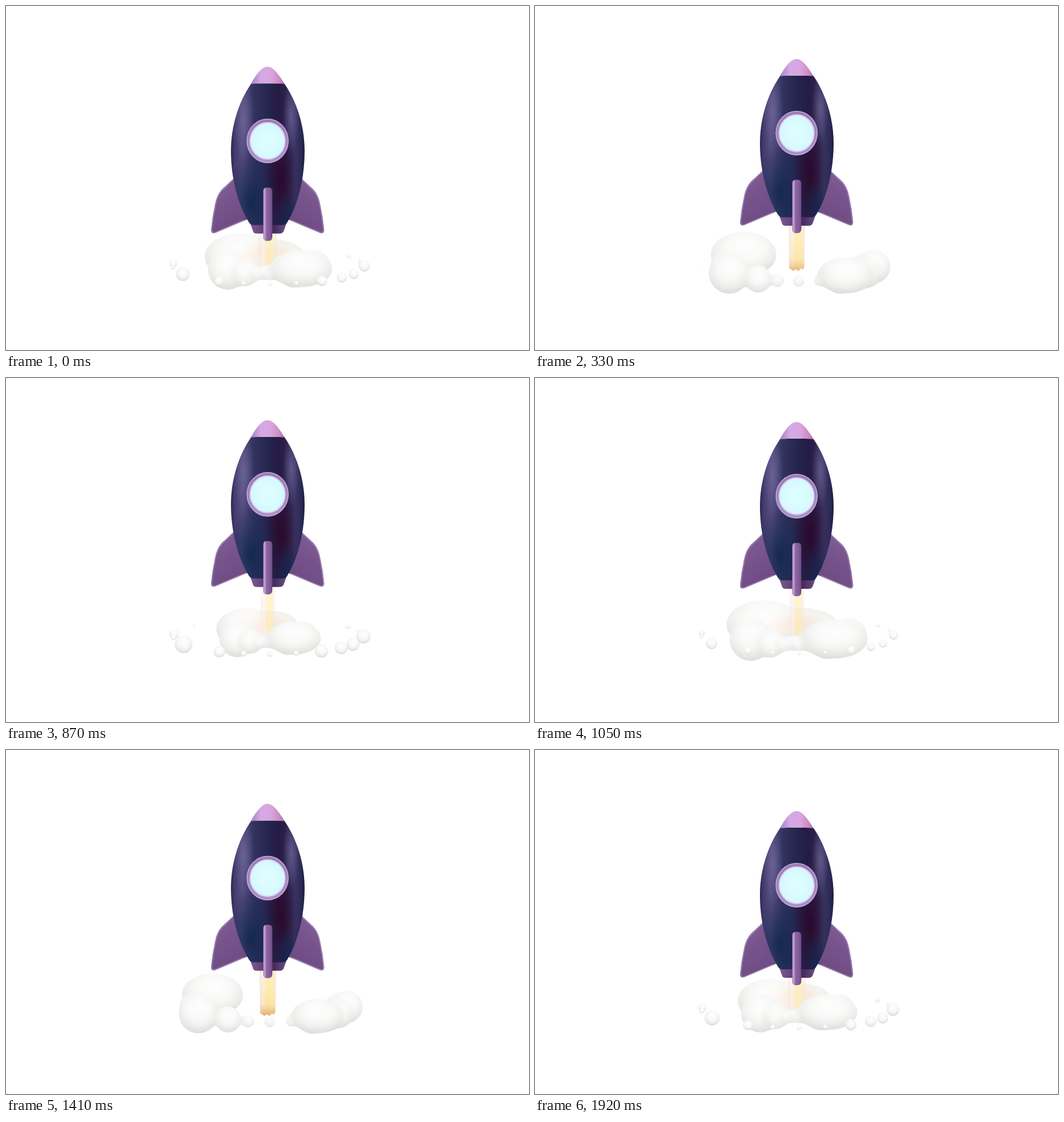
Write an HTML page that moves like this. It is 923 by 607 pixels and loops after 1.95 s.

```html
<!DOCTYPE html>
<html lang="en">
<head>
<meta charset="utf-8">
<title>Rocket</title>
<style>
  html, body { margin: 0; width: 100%; height: 100%; overflow: hidden; background: #fff; }
  svg { display: block; width: 100vw; height: 100vh; }
</style>
</head>
<body>
<svg viewBox="0 0 923 607">
  <defs>
    <radialGradient id="ball" cx=".5" cy=".4" r=".61" fx=".53" fy=".3">
      <stop offset="0" stop-color="#fefefe"/>
      <stop offset=".5" stop-color="#f9f9f8"/>
      <stop offset=".8" stop-color="#ecedea"/>
      <stop offset="1" stop-color="#d3d6d1"/>
    </radialGradient>
    <radialGradient id="wall">
      <stop offset="0" stop-color="#f4efea"/>
      <stop offset=".65" stop-color="#f5f2ee"/>
      <stop offset=".88" stop-color="#f7f8f6"/>
      <stop offset="1" stop-color="#e2e8e4"/>
    </radialGradient>
    <radialGradient id="warm">
      <stop offset="0" stop-color="#fbdcc0" stop-opacity=".7"/>
      <stop offset="1" stop-color="#fbe9dc" stop-opacity="0"/>
    </radialGradient>
    <linearGradient id="jet">
      <stop offset="0" stop-color="#efe3e2" stop-opacity=".7"/>
      <stop offset=".25" stop-color="#fbf3ea"/>
      <stop offset=".4" stop-color="#fdebc4"/>
      <stop offset=".6" stop-color="#fff0a8"/>
      <stop offset=".82" stop-color="#fcecc6"/>
      <stop offset="1" stop-color="#f3e5e0" stop-opacity=".7"/>
    </linearGradient>
    <linearGradient id="ember" x1="0" y1="0" x2="0" y2="1">
      <stop offset=".2" stop-color="#ffdf7c" stop-opacity=".1"/>
      <stop offset=".75" stop-color="#fbd488" stop-opacity=".5"/>
      <stop offset="1" stop-color="#d99a62"/>
    </linearGradient>
    <linearGradient id="hull">
      <stop offset="0" stop-color="#2d2650"/>
      <stop offset=".05" stop-color="#453c6c"/>
      <stop offset=".15" stop-color="#504a7c"/>
      <stop offset=".32" stop-color="#32325e"/>
      <stop offset=".5" stop-color="#25264e"/>
      <stop offset=".64" stop-color="#251c44"/>
      <stop offset=".74" stop-color="#2a2049"/>
      <stop offset=".86" stop-color="#383462"/>
      <stop offset=".95" stop-color="#2c2b56"/>
      <stop offset="1" stop-color="#1d1b42"/>
    </linearGradient>
    <radialGradient id="shine">
      <stop offset="0" stop-color="#7d72a6" stop-opacity=".6"/>
      <stop offset="1" stop-color="#7d72a6" stop-opacity="0"/>
    </radialGradient>
    <radialGradient id="navy">
      <stop offset="0" stop-color="#10274e" stop-opacity=".9"/>
      <stop offset="1" stop-color="#142a50" stop-opacity="0"/>
    </radialGradient>
    <radialGradient id="plum">
      <stop offset="0" stop-color="#2a0829" stop-opacity=".95"/>
      <stop offset="1" stop-color="#2f0b32" stop-opacity="0"/>
    </radialGradient>
    <linearGradient id="nose">
      <stop offset="0" stop-color="#a680c2"/>
      <stop offset=".3" stop-color="#d5a9e4"/>
      <stop offset=".6" stop-color="#d9a5e0"/>
      <stop offset=".85" stop-color="#cd8cc2"/>
      <stop offset="1" stop-color="#a46ba8"/>
    </linearGradient>
    <linearGradient id="fin" x1="0" y1="0" x2=".6" y2="1">
      <stop offset="0" stop-color="#85629b"/>
      <stop offset=".5" stop-color="#77538b"/>
      <stop offset="1" stop-color="#6b4a80"/>
    </linearGradient>
    <linearGradient id="keel">
      <stop offset="0" stop-color="#a584bd"/>
      <stop offset=".18" stop-color="#c4a3d6"/>
      <stop offset=".35" stop-color="#8d65a0"/>
      <stop offset=".75" stop-color="#825a98"/>
      <stop offset="1" stop-color="#694680"/>
    </linearGradient>
    <linearGradient id="base">
      <stop offset="0" stop-color="#7d5a94"/>
      <stop offset=".35" stop-color="#634376"/>
      <stop offset=".65" stop-color="#452a5a"/>
      <stop offset="1" stop-color="#6b4f88"/>
    </linearGradient>
    <linearGradient id="ring" x1="0" y1="0" x2="0" y2="1">
      <stop offset="0" stop-color="#9c78b2"/>
      <stop offset="1" stop-color="#ac92ca"/>
    </linearGradient>
    <radialGradient id="glass">
      <stop offset=".4" stop-color="#dcfdff"/>
      <stop offset="1" stop-color="#d5f8fd"/>
    </radialGradient>
    <filter id="goo" filterUnits="userSpaceOnUse" x="260" y="350" width="410" height="190" color-interpolation-filters="sRGB">
      <feGaussianBlur id="melt" stdDeviation="5"/>
      <feColorMatrix values="1 0 0 0 0  0 1 0 0 0  0 0 1 0 0  0 0 0 8 -3.5"/>
    </filter>
    <path id="hullShape" d="M433 136C409 171 397 214 397 255C397 305 410 350 428 380Q431 386 437 386H488Q494 386 497 380C515 350 527 305 527 255C527 214 515 171 491 136Z"/>
    <clipPath id="hullClip"><use href="#hullShape"/></clipPath>
    <g id="sideFin">
      <path d="M404 302L381 323Q372 333 369 349Q364 372 362 394Q361.500 402 369 400L440 370V302Z" fill="url(#fin)"/>
      <path d="M403 303.500L382 324Q373 333 370 349Q365 372 363 394Q363 400 369 399L420 377.500" fill="none" stroke="#a68cc0" stroke-width="2" stroke-opacity=".7"/>
    </g>
  </defs>

  <g id="oldBack"></g>
  <g id="newBack" filter="url(#goo)"></g>
  <ellipse id="glow" cx="462" cy="437" rx="54" ry="32" fill="url(#warm)"/>
  <path id="flame" fill="url(#jet)"/>
  <path id="tip" fill="url(#ember)"/>
  <g id="newFront" filter="url(#goo)"></g>
  <g id="oldFront"></g>

  <g id="rocket">
    <use href="#sideFin"/>
    <use href="#sideFin" transform="translate(923.4) scale(-1 1)"/>
    <path d="M431 383L436 397Q437 401 442 401H483Q488 401 490 397L495 383Z" fill="url(#base)"/>
    <use href="#hullShape" fill="url(#hull)"/>
    <g clip-path="url(#hullClip)">
      <ellipse cx="420" cy="200" rx="18" ry="75" fill="url(#shine)"/>
      <ellipse cx="503" cy="195" rx="15" ry="65" fill="url(#shine)"/>
      <ellipse cx="432" cy="345" rx="46" ry="85" fill="url(#navy)"/>
      <ellipse cx="485" cy="305" rx="30" ry="90" fill="url(#plum)"/>
      <ellipse cx="500" cy="375" rx="26" ry="50" fill="url(#navy)"/>
    </g>
    <path d="M432 137C441 121 449 111 456 107.800Q461.500 105.500 467 107.800C474 111 482 121 491.500 137Q462 134.500 432 137Z" fill="url(#nose)"/>
    <ellipse cx="461.700" cy="237.500" rx="37" ry="39.200" fill="url(#ring)"/>
    <ellipse cx="461.700" cy="237.500" rx="36.300" ry="38.500" fill="none" stroke="#c3abdc" stroke-width="1.500"/>
    <ellipse cx="461.700" cy="237.500" rx="30.800" ry="32.300" fill="url(#glass)" stroke="#d8cdf2" stroke-width="2"/>
    <path d="M454 326Q454 320 460 320H464Q470 320 470 326V406Q470 414 463 414H460Q454 414 454 408Z" fill="url(#keel)"/>
  </g>
</svg>
<script>
const LOOP = 1950, STEP = 30, TAU = 2 * Math.PI;
const BIRTH = 0.63;                      // age at which a puff appears
const RING = { x: 463, y: 460, rx: 170, ry: 32 };

// Puffs round the ring, back to front: angle in degrees, radius
const PUFFS = [
  [-33, 8], [187, 15], [-17, 8], [176, 8], [0, 22], [27, 20], [153, 27],
  [40, 20], [56, 20], [121, 18], [73, 8], [105, 9], [89, 8]
];
const LEFT_LOBE = [219, 26], RIGHT_LOBE = [56, 20];

const $ = id => document.getElementById(id);
const clamp = v => Math.min(1, Math.max(0, v));

// How a burst of smoke develops with age
const grow = age => clamp((age - BIRTH) / .6) ** .35;
const size = age => 1.55 * grow(age) * (1 - clamp((age - 1.24) / 1.21)) ** 1.25;
const spread = age => 1 - (1 - clamp((age - .65) / 1.5)) ** 2.4;
const swell = age => Math.sin(Math.PI * clamp(age - BIRTH));
const bridge = age => clamp((1.37 - age) / .14);

function ellipse(parent, fill) {
  const el = document.createElementNS('http://www.w3.org/2000/svg', 'ellipse');
  el.setAttribute('fill', `url(#${fill})`);
  return parent.appendChild(el);
}

function place(el, cx, cy, rx, ry) {
  const shape = { cx, cy, rx, ry };
  for (const name in shape) el.setAttribute(name, shape[name].toFixed(2));
}

function makeCloud(back, front) {
  const wall = ellipse(back, 'wall');
  const left = ellipse(back, 'ball');
  const neck = ellipse(front, 'ball');
  const balls = PUFFS.map(() => ellipse(front, 'ball'));
  const right = ellipse(front, 'ball');

  return (age, drift) => {
    const out = spread(age), join = bridge(age) * grow(age);
    const puff = (el, [deg, r], wide = 0, scale = size(age)) => {
      const a = deg * TAU / 360;
      place(el,
        RING.x + RING.rx * Math.cos(a) * out + 14 * wide,
        RING.y + RING.ry * Math.sin(a) * out - 8 * wide + drift,
        r * scale + 32 * wide, r * scale + 7 * wide);
    };
    PUFFS.forEach((p, i) => puff(balls[i], p));
    puff(left, LEFT_LOBE, swell(age), size(age) * clamp((1.95 - age) / .28));
    puff(right, RIGHT_LOBE, swell(age) * clamp((age - .7) * 6));
    place(wall, 466, 435 + 18 * out + drift, (40 + 70 * out) * join, (28 + 18 * out) * join);
    place(neck, 465, RING.y + 26 * out + drift, 46 * join * swell(age), 15 * join);
  };
}

const oldCloud = makeCloud($('oldBack'), $('oldFront'));
const newCloud = makeCloud($('newBack'), $('newFront'));

function drawFlame(lift, ember) {
  const top = 396 + lift, half = 16 + lift * .1, low = half * .9;
  const end = 464 + lift * .35 + ember * 10;
  const d = `M${462 - half} ${top}H${462 + half}L${462 + low} ${end - 6}l-3 5l-3 -3l-4 5` +
            `L460 ${end - 2}l-4 3L${462 - low} ${end - 4}Z`;
  for (const id of ['flame', 'tip']) $(id).setAttribute('d', d);
  $('flame').setAttribute('opacity', .65 + .35 * ember);
  $('tip').setAttribute('opacity', ember);
}

function draw(t) {
  const turn = TAU * t / LOOP;
  const wave = delay => Math.cos(turn - TAU * delay / LOOP);

  const lift = 17 * wave(1830) - 15.2;
  $('rocket').setAttribute('transform', `translate(0 ${lift.toFixed(2)})`);

  // Two bursts per loop, the second a little slower
  const phase = (2 * t / LOOP + .04 * Math.sin(turn)) % 1;
  const age = phase < BIRTH ? phase + 1 : phase;
  const drift = 3.5 * wave(300) - 3.5;
  newCloud(age, drift);
  oldCloud(age + 1, drift);
  $('melt').setAttribute('stdDeviation', Math.max(.3, 5 * swell(age)));

  const heat = Math.cos(TAU * phase);
  $('glow').setAttribute('opacity', Math.max(0, heat));
  drawFlame(lift, Math.max(0, -heat));
}

const start = performance.now();
function tick() {
  const t = (performance.now() - start) % LOOP;
  draw(Math.floor(t / STEP) * STEP);
  requestAnimationFrame(tick);
}
tick();
</script>
</body>
</html>
```
